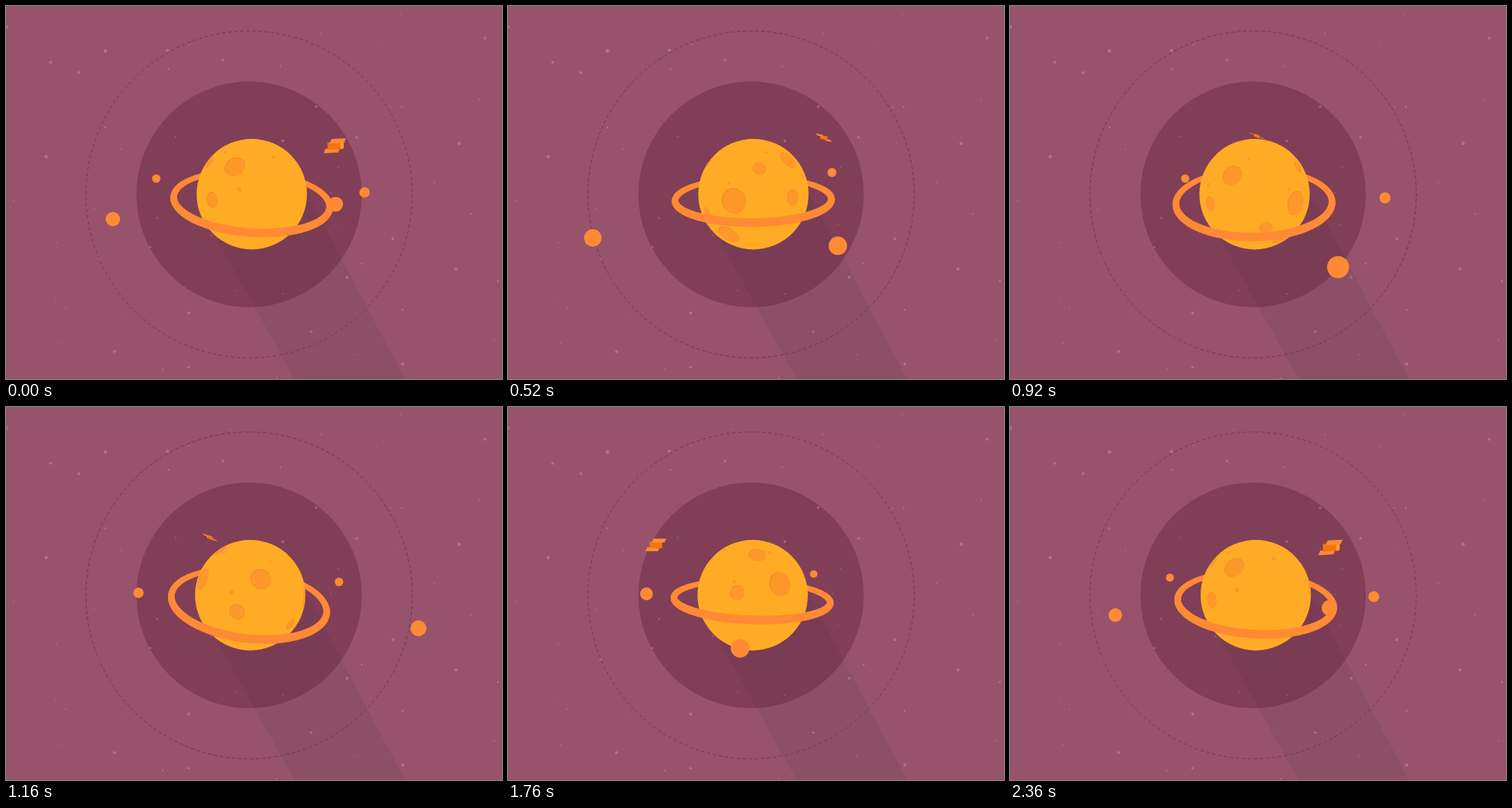
Write an HTML page with a canvas that moves like this. It is 658 px wide and 494 px high and loops after 2400 ms.

```html
<!DOCTYPE html>
<html lang="en">
<head>
<meta charset="utf-8">
<title>Ringed planet</title>
<style>
  html, body { margin: 0; height: 100%; overflow: hidden; background: #96536b; }
  canvas { display: block; }
</style>
</head>
<body>
<canvas id="stage" width="658" height="494"></canvas>
<script>
const ctx = document.getElementById('stage').getContext('2d');
const LOOP = 2400, STEP = 40, TAU = Math.PI * 2, DEG = Math.PI / 180;
const { sin, cos } = Math;
const ORANGE = '#ff8a35';

// Camera: vanishing point and inverse distance
const EYE_X = 325, EYE_Y = 156.6, DEPTH = 0.00284, PLANE = 92;
const PLANET_R = 73.2, RING_R = 99.5;

function seeded(seed) {
  return () => (seed = seed * 16807 % 2147483647) / 2147483647;
}

// One star in each cell of a loose grid, most of them tiny
const random = seeded(41);
const stars = Array.from({ length: 63 }, (_, i) => ({
  x: (i % 9 + random()) * 658 / 9,
  y: (Math.floor(i / 9) + random()) * 494 / 7,
  r: 0.8 + 1.7 * random() ** 1.6
}));

// The large craters are placed, the specks between them scattered
const crater = (lat, lon, size) => ({ lat: lat * DEG, lon: lon * DEG, size: size * DEG });
const craters = [
  crater(9, -96, 11.3), crater(23, 123, 10.8), crater(44, -24, 9.7), crater(39, -164, 9.2),
  crater(53, 101, 8), crater(9, -39, 7.3), crater(8, 176, 7), crater(15, 82, 6.5),
  crater(38, -71, 6), crater(-8, -128, 6), crater(-28, -106, 11.2),
  ...Array.from({ length: 8 }, (_, i) => crater(i % 2 ? 56 : 24, i * 45 - 102, 1.2 + random()))
];

const moons = [
  { radius: 188.7, front: 810, drop: PLANE, size: 7.1 },
  { radius: 164, front: 366, drop: PLANE, size: 7 },
  { radius: 153.6, front: 1784, drop: PLANE, size: 7 },
  { radius: 132.5, front: 2159, drop: 73.8, size: 6.9 }
];
const satellite = { radius: 125, front: 2130, drop: 20.8 };

function disc(x, y, r, color) {
  ctx.fillStyle = color;
  ctx.beginPath();
  ctx.arc(x, y, r, 0, TAU);
  ctx.fill();
}

function polygon(points, color) {
  ctx.fillStyle = color;
  ctx.beginPath();
  for (const [x, y] of points) ctx.lineTo(x, y);
  ctx.fill();
}

function project(x, drop, z) {
  const scale = 1 / (1 - DEPTH * z);
  return { x: EYE_X + x * scale, y: EYE_Y + drop * scale, scale, z };
}

function orbit({ radius, front, drop }, t) {
  const angle = (t - front) / LOOP * TAU;
  return { angle, ...project(radius * sin(angle), drop, radius * cos(angle)) };
}

// The axis precesses once and nods twice per loop
function wobble(t) {
  const w = t / LOOP * TAU, slow = w - 221 * DEG, fast = 2 * w - 52 * DEG;
  return {
    roll: (2.35 + 4.75 * cos(fast) + 2.2 * cos(slow)) * DEG,
    pitch: (4.1 - 4.5 * sin(fast) - 1.8 * sin(slow)) * DEG,
    shift: 1.1 * cos(w - 0.3)
  };
}

function drawBackdrop(t) {
  ctx.fillStyle = '#96536b';
  ctx.fillRect(0, 0, 658, 494);
  disc(322.5, 249.5, 149.5, '#813e57');
  polygon([[383, 494], [529, 494], [389, 229], [261, 275]], 'rgba(50,40,60,.1)');
  for (const { x, y, r } of stars) disc(x, y, r, 'rgba(240,180,205,.3)');

  const dash = TAU * 216.5 / 340;
  ctx.strokeStyle = '#6c3850';
  ctx.lineWidth = 1;
  ctx.setLineDash([dash, dash]);
  ctx.lineDashOffset = -t / LOOP * dash * 20;
  ctx.beginPath();
  ctx.arc(322.5, 249.5, 216.5, 0, TAU);
  ctx.stroke();
  ctx.setLineDash([]);
}

function drawRing({ roll, pitch, shift }, side) {
  const point = a => {
    const x = RING_R * sin(a), z = RING_R * cos(a), y = z * sin(pitch);
    const p = project(x * cos(roll) - y * sin(roll), PLANE + y * cos(roll) + x * sin(roll), z * cos(pitch));
    p.x += 1.6 * shift - 0.5;
    return p;
  };
  const start = side > 0 ? -TAU / 4 : TAU / 4, steps = 60;
  ctx.strokeStyle = ORANGE;
  ctx.lineCap = 'round';
  for (let i = 0; i < steps; i++) {
    const from = point(start + i / steps * TAU / 2), to = point(start + (i + 1) / steps * TAU / 2);
    ctx.lineWidth = 8.1 * from.scale;
    ctx.beginPath();
    ctx.moveTo(from.x, from.y);
    ctx.lineTo(to.x, to.y);
    ctx.stroke();
  }
}

function drawPlanet(t, { roll, pitch, shift }) {
  const cx = EYE_X + shift, cy = 249.2, tilt = 14.7 * DEG + pitch;
  disc(cx, cy, PLANET_R, '#ffab26');
  ctx.save();
  ctx.clip();

  const toView = ([x, y, z]) => {
    const up = y * cos(tilt) - z * sin(tilt), near = z * cos(tilt) + y * sin(tilt);
    return [x * cos(roll) + up * sin(roll), up * cos(roll) - x * sin(roll), near];
  };
  const toScreen = ([x, y, z]) => {
    const f = PLANET_R * (z > 0.2 ? 0.98 / (1 - 0.2 * z) : 1 / Math.hypot(x, y));
    return [cx + x * f, cy - y * f];
  };
  const outline = (lat, lon, r, offset) => Array.from({ length: 36 }, (_, i) => {
    const a = i / 36 * TAU, c = cos(r), e = cos(a) * sin(r), n = sin(a) * sin(r);
    const out = c * cos(lat) - n * sin(lat);
    const [x, y] = toScreen(toView([
      out * sin(lon) + e * cos(lon), c * sin(lat) + n * cos(lat), out * cos(lon) - e * sin(lon)
    ]));
    return [x + offset, y + offset];
  });

  for (const { lat, lon, size } of craters) {
    const turned = lon + t / LOOP * TAU;
    const center = toView([cos(lat) * sin(turned), sin(lat), cos(lat) * cos(turned)]);
    if (center[2] < 0.16) continue;
    polygon(outline(lat, turned, size, 0), '#f79029');
    polygon(outline(lat, turned, size * 0.92, size * 4), '#fe982a');
  }
  ctx.restore();
}

// The panels swing with the orbit, so the pose follows its angle
function drawSatellite({ x, y, scale, angle }) {
  const near = cos(angle);
  const px = (7 * cos(angle + 10 * DEG) - 1.5) * scale, py = (-4.2 - 0.7 * near) * scale;
  const ux = (6 + 1.3 * near) * scale, uy = (0.7 - 1.3 * near) * scale;
  const vx = px * 0.27, vy = py * 0.45, thick = (6.3 + near) * scale;
  const panel = side => {
    const mx = x + px * side, my = y + py * side;
    polygon([[mx - ux - vx, my - uy - vy], [mx + ux - vx, my + uy - vy],
      [mx + ux + vx, my + uy + vy], [mx - ux + vx, my - uy + vy]], ORANGE);
  };
  panel(-1);
  ctx.strokeStyle = '#f0760f';
  ctx.lineCap = 'butt';
  ctx.lineWidth = thick;
  ctx.beginPath();
  ctx.moveTo(x - ux, y - uy);
  ctx.lineTo(x + ux, y + uy);
  ctx.stroke();
  if (sin(angle) > 0 && near > 0) {
    ctx.fillStyle = '#ffa02c';
    ctx.beginPath();
    ctx.ellipse(x + ux, y + uy, 3 * near, thick / 2, 0, 0, TAU);
    ctx.fill();
  }
  panel(1);
}

function draw(t) {
  const pose = wobble(t);
  const bodies = moons.map(m => {
    const p = orbit(m, t);
    return { z: p.z, draw: () => disc(p.x, p.y, m.size * p.scale, ORANGE) };
  });
  const sat = orbit(satellite, t);
  bodies.push({ z: sat.z, draw: () => drawSatellite(sat) });
  bodies.sort((a, b) => a.z - b.z);

  drawBackdrop(t);
  bodies.filter(b => b.z < 0).forEach(b => b.draw());
  drawRing(pose, -1);
  drawPlanet(t, pose);
  drawRing(pose, 1);
  bodies.filter(b => b.z >= 0).forEach(b => b.draw());
}

function frame() {
  draw(Math.floor(performance.now() / STEP) * STEP % LOOP);
  requestAnimationFrame(frame);
}
frame();
</script>
</body>
</html>
```
